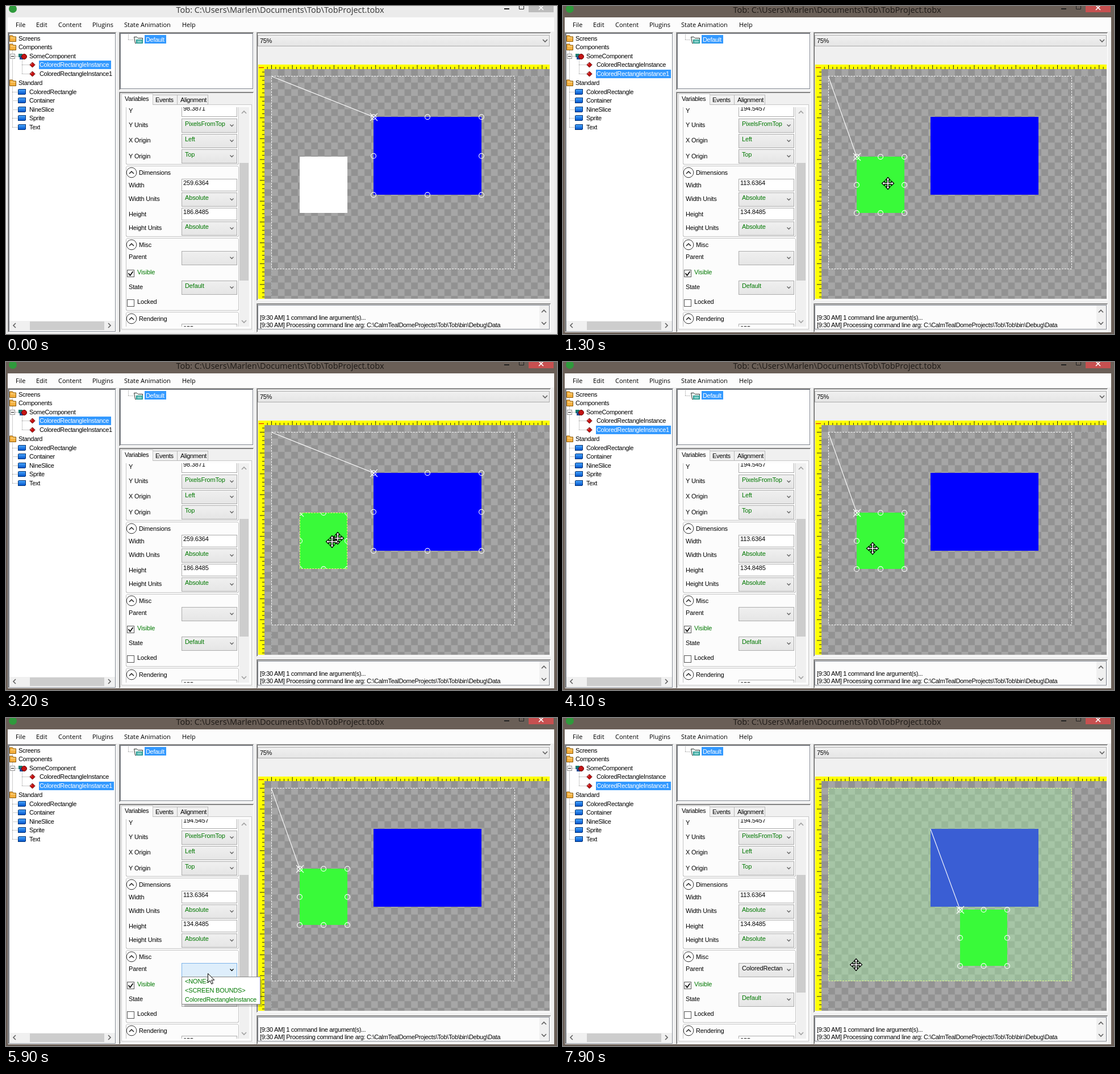
Recreate the animation shown at these times as an HTML page. Size 970 px wide and 577 px high, loop 8 s.

```html
<!DOCTYPE html>
<html lang="en">
<head>
<meta charset="utf-8">
<title>Layout editor</title>
<style>
html, body { margin: 0; width: 100%; height: 100%; overflow: hidden; background: #f0f0f0; }
svg { display: block; width: 970px; height: 577px; }
rect, .crisp { shape-rendering: crispEdges; }
text { font: 11px "Liberation Sans", Arial, sans-serif; letter-spacing: -.15px; white-space: pre; }
.tight { letter-spacing: -.32px; }
.menu { font: 11px "Open Sans", sans-serif; letter-spacing: 0; }
.title { font: 14.5px "Open Sans", sans-serif; letter-spacing: 0; text-anchor: middle; }
</style>
</head>
<body>
<svg viewBox="0 0 970 577">
  <defs>
    <pattern id="checker" x="467" y="123" width="24" height="24" patternUnits="userSpaceOnUse">
      <path fill="#a6a6a6" d="M0 0h24v24h-24z"/>
      <path fill="#929292" d="M0 0h12v12h-12zM12 12h12v12h-12z"/>
    </pattern>
    <linearGradient id="gem" x2="0" y2="1">
      <stop stop-color="#4aa8ff"/><stop offset="1" stop-color="#0050c8"/>
    </linearGradient>
    <linearGradient id="button" x2="0" y2="1">
      <stop stop-color="#f0f0f0"/><stop offset="1" stop-color="#e5e5e5"/>
    </linearGradient>
    <clipPath id="comboClip"><path d="M310 178h76v400h-76z"/></clipPath>
    <clipPath id="panelClip"><path d="M204 178h224v386h-224z"/></clipPath>
    <clipPath id="logClip"><path d="M443 528h495v39h-495z"/></clipPath>
    <clipPath id="boxClip"><path d="M517 265h84v99h-84z"/></clipPath>
  </defs>
  <g id="base"></g>
  <g id="live"></g>
</svg>
<script>
const LOOP = 8000, STEP = 100;
const ZOOM = .977; // the whole window is shown slightly reduced
const GREEN = '#007800', SELECT = '#3399ff', LIME = '#39fa39';
const COMPONENT = { x: 467, y: 123, w: 429, h: 340 };
const BLUE = { x: 647, y: 195, w: 190, h: 137 };
const SMALL = { x: 517, y: 265, w: 84, h: 99 };
const NESTED = { x: 699, y: 337, w: 83, h: 99 };

// Pointer path: time, x, y
const PATH = [
  [400, 892, 392], [500, 800, 372], [600, 690, 340], [700, 594, 305], [900, 572, 312],
  [1600, 572, 312], [1700, 592, 306], [1800, 632, 292], [1900, 701, 277], [2000, 712, 274],
  [2900, 712, 274], [3000, 640, 294], [3100, 584, 310], [3200, 574, 316],
  [4000, 574, 316], [4100, 545, 328], [4300, 482, 354], [4400, 452, 369], [4700, 372, 458],
  [4900, 352, 446], [5000, 325, 448], [5200, 214, 452], [5300, 216, 474], [5500, 310, 454],
  [5600, 355, 449], [6100, 355, 449], [6400, 350, 466], [6900, 362, 491],
  [7500, 362, 491], [7600, 400, 472], [7700, 440, 458], [7800, 482, 444], [7900, 516, 434]
];

const within = (t, ...spans) => spans.some(([a, b]) => t >= a && t < b);
const esc = s => s.replace(/&/g, '&amp;').replace(/</g, '&lt;');
const text = (x, mid, s, cls = '', fill = '#000') =>
  `<text x="${x}" y="${mid + 4}" class="${cls}" fill="${fill}">${esc(s)}</text>`;
const rect = (x, y, w, h, fill, extra = '') =>
  `<rect x="${x}" y="${y}" width="${w}" height="${h}" fill="${fill}" ${extra}/>`;
const framed = (x, y, w, h, fill, stroke, extra = '') =>
  rect(x + .5, y + .5, w - 1, h - 1, fill, `stroke="${stroke}" ${extra}`);
const path = (d, stroke = '#000', width = 1, extra = '') =>
  `<path d="${d}" fill="none" stroke="${stroke}" stroke-width="${width}" ${extra}/>`;
const box = (r, fill) => rect(r.x, r.y, r.w, r.h, fill);
const dashed = (r, color) => path(`M${r.x + .5} ${r.y + .5}h${r.w - 1}v${r.h - 1}h${1 - r.w}z`,
  color, 1, `stroke-dasharray="${3 * ZOOM} ${2 * ZOOM}"`);
const arrow = (x, y, dx, dy, color = '#606060') => {
  const d = dx ? `M${x - dx * 2} ${y - 4}l${dx * 4} 4l${-dx * 4} 4`
               : `M${x - 4} ${y - dy * 2}l4 ${dy * 4}l4 ${-dy * 4}`;
  return path(d, color, 1.6);
};

// Panel with a two pixel dark edge at the top left and a light one opposite
function sunken(x, y, w, h, fill) {
  const edge = (i, color) => path(`M${x + i + .5} ${y + h - i}V${y + i + .5}H${x + w - i}`, color, 1, 'class="crisp"');
  return framed(x, y, w, h, fill, '#fff') + edge(0, '#a0a0a0') + edge(1, '#696969');
}

function field(y, value, color = '#000') {
  return framed(309, y, 98, 22, '#fff', '#ababab') + text(312, y + 7, value, '', color);
}

function combo(y, value, color = GREEN, hot = false) {
  return framed(309, y, 98, 25, hot ? '#deeefb' : 'url(#button)', hot ? '#7eb4ea' : '#acacac') +
    path(`M394.5 ${y + 10.5}l3 3l3 -3`, hot ? '#000' : '#606060', 1.3) +
    `<g clip-path="url(#comboClip)">${text(315, y + 9, value, '', color)}</g>`;
}

function group(y, h, name) {
  const mid = y + 12;
  return framed(211, y, 199, h, '#fcfcfc', '#c4c4c4', 'rx="3"') +
    `<circle cx="221" cy="${mid}" r="8.8" fill="#fff" stroke="#333"/>` +
    path(`M217 ${mid + 2}l4 -4l4 4`, '#222', 1.5) + text(234, mid, name);
}

function check(y, name, on, color) {
  return framed(213, y - 4, 13, 13, '#fff', '#555') +
    (on ? path(`M215.5 ${y + 2}l3 4l5 -7`, '#111', 1.8) : '') + text(231, y, name, '', color);
}

function folder(y) {
  return `<path d="M6.5 ${y - 5}h5l1.500 2h4.500v8.500h-11z" fill="#f4b040" stroke="#8a5600"/>` +
    path(`M8 ${y - 1}h9`, '#ffe4a0');
}

function tree() {
  const gray = 'stroke-dasharray="1 1" class="crisp"';
  let s = sunken(3, 46, 191, 528, '#f0f0f0') + framed(5, 48, 188, 525, '#fff', '#828790');
  s += path('M11.500 62V130M14 88.500h8M28.500 94V119.500M28 103.500h14M28 119.500h14M11.500 140V213', '#999', 1, gray);
  [['Screens', 57], ['Components', 72], ['Standard', 135]].forEach(([n, y]) => {
    s += folder(y) + text(22, y, n, 'tight');
  });
  s += framed(7, 84, 9, 9, '#fff', '#919191') + path('M9 88.500h5', '#000');
  s += rect(22, 84, 7, 6, '#167c70') + rect(24, 88, 6, 6, '#234b94') +
    '<circle cx="32" cy="89" r="4.500" fill="#c41414" stroke="#600"/>' + text(41, 88, 'SomeComponent', 'tight');
  ['ColoredRectangle', 'Container', 'NineSlice', 'Sprite', 'Text'].forEach((n, i) => {
    const y = Math.round(150.5 + i * 15.6);
    s += path(`M11 ${y}.5h10`, '#999', 1, gray) +
      `<rect x="21.5" y="${y - 4.5}" width="13" height="9" rx="1.5" fill="url(#gem)" stroke="#003070"/>` +
      text(41, y, n, 'tight');
  });
  s += rect(6, 554, 186, 17, '#f0f0f0') + rect(42, 555, 131, 15, '#cdcdcd');
  return s + arrow(15, 562, -1, 0) + arrow(182, 562, 1, 0);
}

function statePanel() {
  return sunken(199, 46, 237, 102, '#f0f0f0') + framed(201, 48, 234, 98, '#fff', '#828790') +
    path('M215 59.500h10M215.500 50v9', '#999', 1, 'stroke-dasharray="1 1"') +
    '<path d="M225.500 54.500h5l2 2h8v9h-13z" fill="#e8f4f0" stroke="#333"/>' + rect(229, 59, 12, 7, '#2c9c94') +
    path('M231 61.500h8M231 63.500h8', '#d6fffa') + rect(244, 51, 38, 15, SELECT) + text(246, 59, 'Default', 'tight', '#fff');
}

function variables() {
  let s = sunken(199, 151, 237, 423, '#f0f0f0') + framed(203, 173, 230, 396, '#fcfcfc', '#c8c8c8');
  s += framed(258, 156, 44, 18, '#f0f0f0', '#b8b8b8') + framed(301, 156, 55, 18, '#f0f0f0', '#b8b8b8');
  s += framed(203, 154, 56, 20, '#fcfcfc', '#c8c8c8') + rect(204, 172, 54, 3, '#fcfcfc');
  s += text(209, 163, 'Variables', 'tight') + text(263, 165, 'Events', 'tight') + text(307, 165, 'Alignment', 'tight');
  s += '<g clip-path="url(#panelClip)">' + framed(211, 150, 199, 129, '#fcfcfc', '#c4c4c4', 'rx="3"');
  s += group(281, 125, 'Dimensions') + group(408, 128, 'Misc') + group(538, 60, 'Rendering');
  [['Y', 184], ['Y Units', 209], ['X Origin', 236], ['Y Origin', 264], ['Width', 315], ['Width Units', 339],
   ['Height', 366], ['Height Units', 390], ['Parent', 441], ['State', 494]].forEach(([n, y]) => s += text(216, y, n));
  s += combo(198, 'PixelsFromTop') + combo(225, 'Left') + combo(252, 'Top');
  s += combo(328, 'Absolute') + combo(379, 'Absolute') + combo(483, 'Default');
  s += check(468, 'Visible', true, GREEN) + check(520, 'Locked', false);
  s += framed(309, 559, 98, 22, '#fff', '#ababab') + text(312, 567, '255');
  s += rect(411, 178, 17, 386, '#f0f0f0') + rect(411, 276, 16, 207, '#cdcdcd');
  return s + arrow(419, 187, 0, -1, '#a0a0a0') + arrow(419, 555, 0, 1, '#a0a0a0') + '</g>';
}

function workspace() {
  let s = sunken(441, 46, 518, 472, '#f0f0f0');
  s += framed(443, 51, 514, 20, 'url(#button)', '#acacac') + text(447, 61, '75%', 'tight') + arrow(949, 61, 0, 1);
  s += rect(444, 103, 513, 9, '#ff0') + rect(444, 103, 11, 412, '#ff0');
  let ticks = '';
  for (let i = -1; i < 67; i++) {
    const p = i * 7.5 * ZOOM + .5;
    ticks += `M${467 + p} 111v${i % 5 ? -4 : -7}`;
    if (p < 392) ticks += `M455 ${123 + p}h${i % 5 ? -4 : -8}`;
  }
  s += path(ticks, '#222') + path('M445 108.500h9', '#e00000');
  return s + rect(455, 111, 502, 404, 'url(#checker)');
}

function log() {
  return sunken(441, 523, 518, 51, '#f0f0f0') + framed(443, 526, 514, 43, '#fcfcfc', '#828790') +
    rect(939, 527, 17, 40, '#f0f0f0') +
    arrow(947, 537, 0, -1) + arrow(947, 558, 0, 1) + '<g clip-path="url(#logClip)">' +
    text(447, 548, '[9:30 AM] 1 command line argument(s)...', 'tight') +
    text(447, 561, '[9:30 AM] Processing command line arg: C:\\CalmTealDomeProjects\\Tob\\Tob\\bin\\Debug\\Data', 'tight') + '</g>';
}

function base() {
  let s = rect(0, 0, 970, 577, '#f0f0f0') + rect(3, 20, 963, 25, '#fcfcfc');
  [['File', 17], ['Edit', 53], ['Content', 92], ['Plugins', 152], ['State Animation', 208], ['Help', 310]]
    .forEach(([n, x]) => s += text(x, 33, n, 'menu'));
  return s + tree() + statePanel() + variables() + workspace() + log();
}

function chrome(active) {
  const color = active ? '#6a5f57' : '#ebebeb';
  return `<path class="crisp" fill="${color}" fill-rule="evenodd" d="M0 0h970v577h-970zM3 20v554h962v-554z"/>` +
    '<circle cx="12" cy="5" r="7" fill="#2f9a3c"/>' +
    `<text class="title" x="482.5" y="12" fill="${active ? '#1c1815' : '#333'}">Tob: C:\\Users\\Marlen\\Documents\\Tob\\TobProject.tobx</text>` +
    rect(877, 4, 9, 2, '#222') + path('M903.500 -2v7.500h8v-7.500', '#222') +
    rect(920, 0, 44, 11, active ? '#c75050' : '#bcbcbc') + path('M938 -1l8 8M946 -1l-8 8', '#fff', 1.7);
}

function instances(picked) {
  return ['ColoredRectangleInstance', 'ColoredRectangleInstance1'].map((n, i) => {
    const y = i ? 119 : 103, on = i === picked;
    return (on ? rect(58, y - 7, i ? 132 : 127, 15, SELECT) : '') +
      `<path d="M46.500 ${y - 4}l4.500 4.500l-4.500 4.500l-4.500 -4.500z" fill="#c81010" stroke="#500"/>` +
      path(`M44 ${y}l2 -2`, '#ff9c9c') + text(59, y, n, 'tight', on ? '#fff' : '#000');
  }).join('');
}

function handles(r) {
  let s = '';
  for (let i = 0; i < 9; i++) {
    if (i === 4) continue;
    s += `<circle cx="${r.x + r.w * (i % 3) / 2}" cy="${r.y + r.h * Math.floor(i / 3) / 2 + .3}" r="4.400" fill="none" stroke="#fff" stroke-width="1.1"/>`;
  }
  return s + path(`M${r.x - 6} ${r.y - 6}l13 13m0 -13l-13 13`, '#fff', 1.1);
}

function canvas(t, picked) {
  const small = t < 7200 ? SMALL : NESTED;
  const lit = within(t, [400, 800], [1800, 1900], [4200, 4400], [7800, LOOP]);
  let s = path('M467.500 111V515M467 123.500H957', '#b4bcc2', 1, 'stroke-dasharray="2 3" opacity=".6" class="crisp"');
  if (lit) s += box(COMPONENT, 'rgba(165,255,165,.35)');
  s += dashed(COMPONENT, lit ? '#e6ff96' : '#fff');
  s += box(BLUE, lit ? '#3a5ed4' : '#00f') + box(small, t < 400 ? '#fff' : LIME);
  if (within(t, [800, 1200], [3100, 3500])) s += dashed(small, '#f4ff70');
  if (within(t, [1900, 2400])) s += dashed(BLUE, '#fff');
  if (within(t, [2400, 3500])) s += `<g clip-path="url(#boxClip)">${handles(SMALL)}</g>`;
  const target = picked ? small : BLUE, from = t < 7200 ? COMPONENT : BLUE;
  return s + path(`M${from.x} ${from.y + .5}L${target.x} ${target.y}`, '#fff', 1.1) + handles(target);
}

function popup(t, y) {
  const rows = ['<NONE>', '<SCREEN BOUNDS>', 'ColoredRectangleInstance'];
  const hot = t < 6200 ? -1 : Math.min(2, Math.floor((y - 455) / 16));
  return rect(314, 460, 137, 48, 'rgba(0,0,0,.18)') + framed(309, 455, 139, 49, '#fff', '#888') +
    rows.map((n, i) => (i === hot ? rect(310, 456 + i * 16, 137, 16, SELECT) : '') +
      text(315, 463 + i * 16, n, '', i === hot ? '#fff' : GREEN)).join('');
}

function pointer(x, y) {
  if (x > 455) {
    let d = '';
    for (const [a, b] of [[0, -1], [1, 0], [0, 1], [-1, 0]]) {
      // Each arm is turned a quarter from the one before
      const at = (u, v) => `${x + a * u - b * v} ${y + b * u + a * v}`;
      d += `${d ? 'L' : 'M'}${at(1.5, -1.5)}L${at(6, -1.5)}L${at(6, -4)}L${at(10.5, 0)}L${at(6, 4)}L${at(6, 1.5)}L${at(1.5, 1.5)}`;
    }
    return `<path d="${d}z" fill="#fff" stroke="#000" stroke-width="1.3"/>`;
  }
  return `<path d="M${x + .5} ${y + .5}v16l3.700 -3.500l2.600 6l2.600 -1.100l-2.600 -5.900h5z" fill="#fff" stroke="#000"/>`;
}

function pointerAt(t) {
  const i = PATH.findIndex(p => p[0] > t);
  if (i < 0) return PATH[PATH.length - 1].slice(1);
  const [a, ax, ay] = PATH[i - 1], [b, bx, by] = PATH[i], k = (t - a) / (b - a);
  return [Math.round(ax + (bx - ax) * k), Math.round(ay + (by - ay) * k)];
}

function scene(t) {
  const picked = within(t, [1200, 2400], [3500, LOOP]) ? 1 : 0;
  const [x, y] = t < 400 ? [-50, -50] : pointerAt(t);
  const open = within(t, [5900, 7200]);
  const hot = t < 7200 && (x >= 309 && x < 407 && y >= 431 && y < 456);
  const [top, width, height] = picked ? ['194.5457', '113.6364', '134.8485'] : ['98.3871', '259.6364', '186.8485'];
  let s = chrome(t >= 1200) + instances(picked);
  s += `<g clip-path="url(#panelClip)">${field(173, top)}</g>` + field(304, width) + field(355, height);
  s += combo(431, t < 7200 ? '' : 'ColoredRectangleInstance', '#000', hot);
  s += canvas(t, picked);
  if (open) s += popup(t, y);
  if (within(t, [3200, 3500])) s += pointer(584, 310);
  return s + pointer(x, y);
}

const live = document.getElementById('live');
document.getElementById('checker').setAttribute('patternTransform', `translate(467 123) scale(${ZOOM}) translate(-467 -123)`);
document.getElementById('base').innerHTML = base();
let shown = -1;
function draw() {
  const t = Math.floor(performance.now() % LOOP / STEP) * STEP;
  if (t !== shown) live.innerHTML = scene(shown = t);
  requestAnimationFrame(draw);
}
draw();
</script>
</body>
</html>
```
